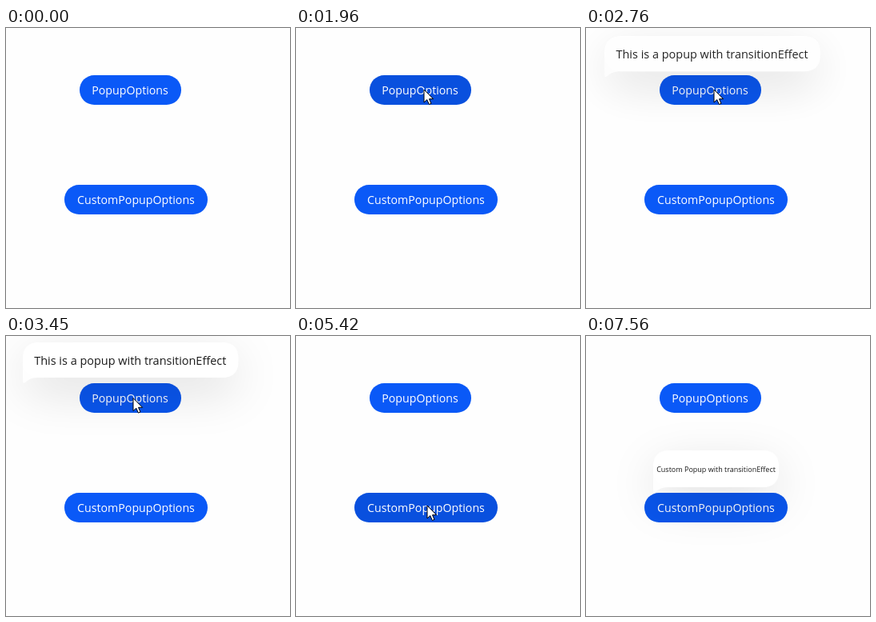
An HTML page that plays this animation: 355 by 350 pixels, repeating every 8600 ms.

```html
<!DOCTYPE html>
<html lang="en">
<head>
<meta charset="utf-8">
<style>
  html, body { margin: 0; width: 100%; height: 100%; overflow: hidden; background: #fefefe; }
  #stage { position: relative; width: 355px; height: 350px; overflow: hidden;
    font: 14.45px "Open Sans", "Noto Sans", sans-serif; }
  #stage > * { position: absolute; }
  .button, .popup { display: flex; align-items: center; justify-content: center; white-space: nowrap; }
  .button { height: 36.5px; border-radius: 18.25px; color: #fff; font-size: 14.2px; font-weight: 500; }
  .popup { color: rgba(0, 0, 0, .9); visibility: hidden; }
  .popup > * { position: absolute; }
  .shadow { inset: 0; border-radius: 20px; box-shadow: 0 18px 60px rgba(0, 0, 0, .13); }
  .popup svg { left: 0; top: 0; overflow: visible; }
  #cursor { left: 0; top: 0; overflow: visible; }
</style>
</head>
<body>
<div id="stage">
  <div class="button" id="plainButton" style="left:91.5px;top:59px;width:127px">PopupOptions</div>
  <div class="button" id="customButton" style="left:73px;top:196px;width:179px">CustomPopupOptions</div>
  <div class="popup" id="plainPopup" style="left:20.5px;top:8px;width:269.5px;height:44px">
    <span>This is a popup with transitionEffect</span>
  </div>
  <div class="popup" id="customPopup" style="left:84px;top:143px;width:157px;height:46px;font-size:9px">
    <span>Custom Popup with transitionEffect</span>
  </div>
  <svg id="cursor" width="14" height="20">
    <path d="M0 0V16L3.8 12.6L6.4 18.5L9 17.4L6.5 11.7H11.6Z" fill="#fff" stroke="#000" stroke-linejoin="round"/>
  </svg>
</div>
<script>
const LOOP = 8600;
const $ = id => document.getElementById(id);
const [plainButton, customButton, plainPopup, customPopup, cursor] =
  ['plainButton', 'customButton', 'plainPopup', 'customPopup', 'cursor'].map($);

const within = (t, from, to) => t >= from && t < to;
const progress = (t, from, to) => Math.min(1, Math.max(0, (t - from) / (to - from)));
const bezier = (a, b, c, d, u) => {
  const v = 1 - u;
  return v * v * v * a + 3 * v * v * u * b + 3 * v * u * u * c + u * u * u * d;
};
const smooth = u => u * u * (3 - 2 * u);

// cubic-bezier(.25, .1, .25, 1)
function ease(x) {
  if (x <= 0 || x >= 1) return x <= 0 ? 0 : 1;
  let low = 0, high = 1;
  for (let i = 0; i < 24; i++) {
    const mid = (low + high) / 2;
    if (bezier(0, .25, .25, 1, mid) < x) low = mid; else high = mid;
  }
  return bezier(0, .1, 1, 1, low);
}

// Speech bubble with its tail at the bottom left
function addBubble(popup) {
  const w = parseFloat(popup.style.width), h = parseFloat(popup.style.height), r = 20;
  const path = `M0 ${r}Q0 0 ${r} 0H${w - r}Q${w} 0 ${w} ${r}V${h - r}Q${w} ${h} ${w - r} ${h}` +
    `H18Q9 ${h} 3 ${h + 6}Q0 ${h + 8} 0 ${h + 5}Z`;
  popup.insertAdjacentHTML('afterbegin',
    `<div class="shadow"></div><svg width="${w}" height="${h}"><path d="${path}" fill="#fff" fill-opacity=".9"/></svg>`);
}
addBubble(plainPopup);
addBubble(customPopup);
customPopup.style.transformOrigin = '50% 120px';

function tint(button, hovered, pressed) {
  const k = pressed ? .9 : hovered ? .95 : 1;
  button.style.background = `rgb(${10 * k}, ${89 * k}, ${247 * k})`;
}

function cursorAt(t) {
  if (t < 3450) {
    const u = progress(t, 560, 1420), s = 1 - (1 - u) ** 1.6;
    return [bezier(-8, 50, 125, 160, s), bezier(178, 92, 38, 77, s)];
  }
  if (t < 5830) {
    const s = smooth(progress(t, 3430, 3970));
    return [bezier(159, 158, 161, 164, s), 77 + 135 * s];
  }
  if (t < 7240) {
    const s = smooth(progress(t, 5800, 6030));
    return [164 - 8 * s, 212 + 3 * s];
  }
  const s = progress(t, 7210, 7560) ** 1.4;
  return [156 + 99 * s, 215 + 137 * s];
}

function render(t) {
  tint(plainButton, within(t, 1200, 4630), within(t, 1960, 2080));
  tint(customButton, t >= 4630, within(t, 5420, 5540) || within(t, 6190, 6310));

  const slide = ease(progress(t, 2020, 3030)), offset = 50 * (1 - slide);
  plainPopup.style.visibility = within(t, 2020, 4630) ? 'visible' : 'hidden';
  plainPopup.style.opacity = slide;
  plainPopup.style.transform = `translate(${offset}px, ${offset}px)`;

  customPopup.style.visibility = t > 6250 ? 'visible' : 'hidden';
  customPopup.style.transform = `scaleY(${ease(progress(t, 6250, 6770))})`;

  const [x, y] = cursorAt(t);
  cursor.style.visibility = within(t, 580, 7560) ? 'visible' : 'hidden';
  cursor.style.transform = `translate(${x}px, ${y}px)`;
}

const start = performance.now();
function tick() {
  render((performance.now() - start) % LOOP);
  requestAnimationFrame(tick);
}
tick();
</script>
</body>
</html>
```
